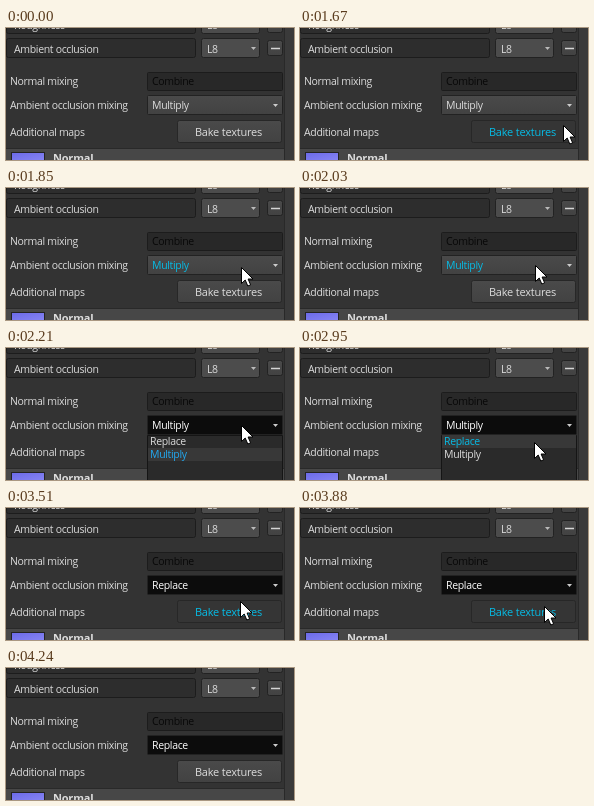
An HTML page for the animation above (4900 ms loop, 288x132 px).

```html
<!DOCTYPE html>
<html lang="en">
<head>
<meta charset="utf-8">
<style>
html, body { margin: 0; width: 100%; height: 100%; overflow: hidden; background: #333; }
svg { display: block; width: 288px; height: 132px; }
text { font: 10.5px "Open Sans", "Noto Sans", sans-serif; letter-spacing: -.33px; fill: #dcdcdc; white-space: pre; }
#bakeText { font-size: 11px; letter-spacing: -.2px; }
</style>
</head>
<body>
<svg viewBox="0 0 288 132">
  <defs>
    <linearGradient id="raised" x2="0" y2="1">
      <stop stop-color="#4a4a4a"/><stop offset="1" stop-color="#424242"/>
    </linearGradient>
    <linearGradient id="thumb" x2="1" y2="1">
      <stop stop-color="#6c6be8"/><stop offset="1" stop-color="#8583f4"/>
    </linearGradient>
  </defs>
  <rect width="288" height="132" fill="#333"/>
  <rect x="278" width="10" height="132" fill="#3a3a3a"/>
  <path d="M278.5 0V132" stroke="#292929"/>

  <g fill="#2d2d2d" stroke="#1c1c1c">
    <rect x=".5" y="-14.5" width="189" height="20" rx="2"/>
    <rect x=".5" y="10.5" width="189" height="19" rx="2"/>
    <rect x="141.5" y="44.5" width="135" height="18" rx="1" fill="#282828"/>
  </g>
  <g fill="url(#raised)" stroke="#222">
    <rect x="195.5" y="-14.5" width="58" height="20" rx="2" fill="#4c4c4c"/>
    <rect x="195.5" y="10.5" width="58" height="19" rx="2" fill="#4c4c4c"/>
    <rect x="261.5" y="-11.5" width="15" height="16" rx="2"/>
    <rect x="261.5" y="12.5" width="15" height="15" rx="2"/>
  </g>
  <path d="M265 20.5H274" stroke="#d5d5d5" stroke-width="1.5"/>
  <path d="M245 19h5l-2.5 3z" fill="#bbb"/>
  <text x="8" y="1">Roughness</text>
  <text x="201" y="1">L8</text>
  <text x="8" y="25">Ambient occlusion</text>
  <text x="201" y="25">L8</text>
  <text x="4" y="57">Normal mixing</text>
  <text x="146" y="57" style="fill:#080808">Combine</text>
  <text x="4" y="81">Ambient occlusion mixing</text>
  <text x="4" y="108">Additional maps</text>

  <rect id="combo" x="141.5" y="67.5" width="135" height="19" rx="1" stroke="#222"/>
  <path d="M267 76h5l-2.5 3z" fill="#ccc"/>
  <text id="comboText" x="146" y="81"></text>
  <rect id="bake" x="171.5" y="92.5" width="104" height="22" rx="2" stroke="#272727"/>
  <text id="bakeText" x="222.5" y="108" text-anchor="middle">Bake textures</text>

  <rect y="121" width="278" height="11" fill="#474747"/>
  <path d="M0 120.5H278" stroke="#292929"/>
  <rect x="5" y="124" width="34" height="8" fill="#242424"/>
  <rect x="6" y="125" width="32" height="7" fill="url(#thumb)"/>
  <text x="47" y="134" style="font-weight:700;font-size:11px;letter-spacing:-.2px">Normal</text>

  <g id="menu">
    <path d="M141.5 133V87.5H276.5V133" fill="#2a2a2a" stroke="#151515"/>
    <rect id="mark" x="142" width="134" height="13" fill="#383838"/>
    <text id="replace" x="144" y="97">Replace</text>
    <text id="multiply" x="144" y="110">Multiply</text>
  </g>
  <path id="cursor" d="M.5 .5V16.5L4.2 13L6.8 19L9.6 17.8L7.1 12H12Z" fill="#fff" stroke="#000" stroke-linejoin="round"/>
</svg>
<script>
const LOOP = 4900;
const CYAN = '#06bce6', BLUE = '#22a8f0', TEXT = '#dcdcdc';
const $ = id => document.getElementById(id);
const fill = (id, color) => { $(id).style.fill = color; };

// start time, pointer x, pointer y
const moves = [
  [0], [1670, 263, 97], [1850, 235, 79], [2030, 235, 77],
  [2770, 235, 88], [2950, 234, 94], [3510, 234, 93],
  [3880, 244, 98], [4060, 274, 130], [4240]
];

function draw(t) {
  const within = (a, b) => t >= a && t < b;
  const open = within(2210, 3510);
  const hoverBake = within(1670, 1850) || within(3510, 4060);
  const hoverCombo = within(1850, 2210);
  const onReplace = t >= 2770;

  fill('combo', t >= 2210 ? '#0c0c0c' : 'url(#raised)');
  fill('comboText', hoverCombo ? CYAN : t >= 2210 ? '#fff' : TEXT);
  $('comboText').textContent = t >= 3510 ? 'Replace' : 'Multiply';
  fill('bake', hoverBake ? '#353535' : 'url(#raised)');
  fill('bakeText', hoverBake ? CYAN : TEXT);

  $('menu').style.display = open ? '' : 'none';
  $('mark').setAttribute('y', onReplace ? 87 : 100);
  fill('replace', onReplace ? CYAN : TEXT);
  fill('multiply', onReplace ? TEXT : BLUE);

  const [, x, y] = moves.findLast(m => m[0] <= t);
  $('cursor').style.display = x ? '' : 'none';
  if (x) $('cursor').setAttribute('transform', `translate(${x} ${y})`);
}

const start = performance.now();
function tick() {
  draw((performance.now() - start) % LOOP);
  requestAnimationFrame(tick);
}
tick();
</script>
</body>
</html>
```
